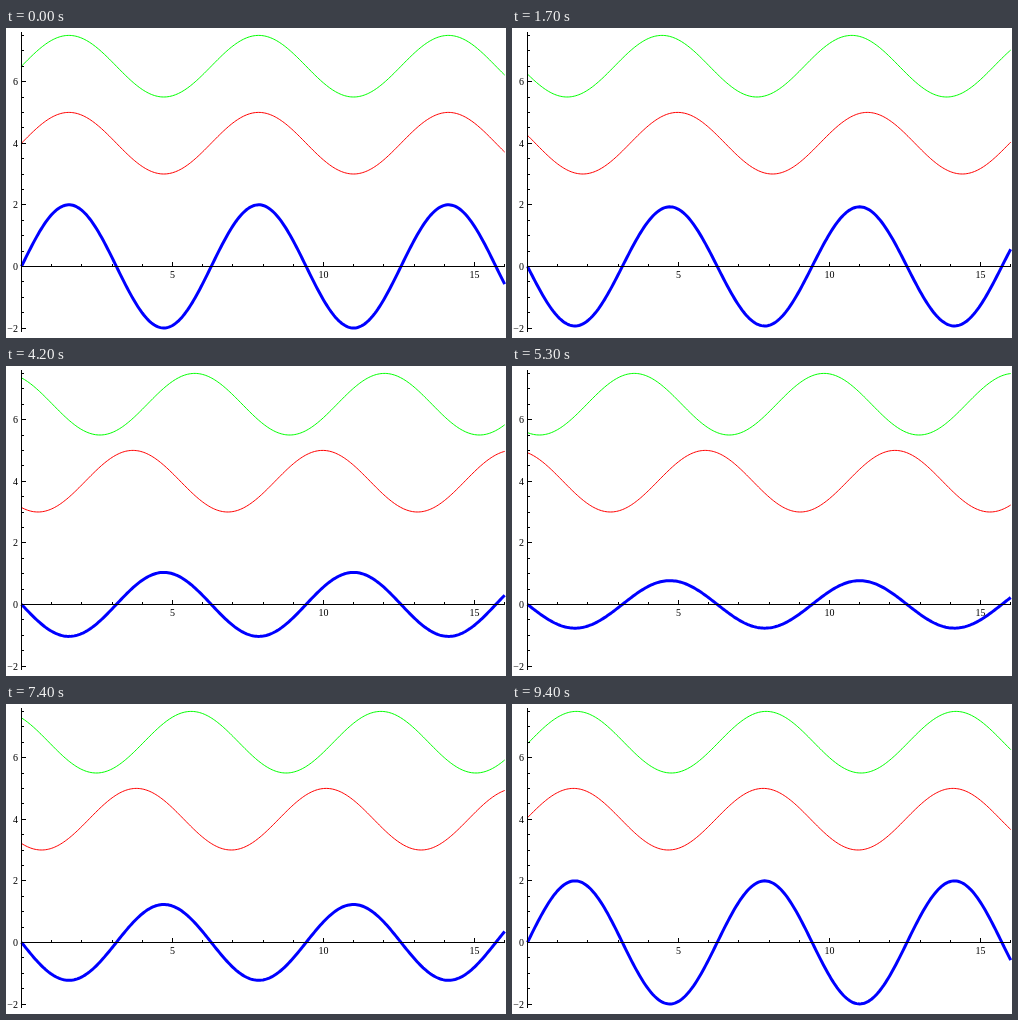
Recreate the animation shown at these times as an HTML page with a canvas. Size 500 by 310 pixels, loop 9500 ms.

```html
<!DOCTYPE html>
<html>
<head>
<meta charset="utf-8">
<style>
html, body { margin: 0; width: 100%; height: 100%; overflow: hidden; background: #fff; }
canvas { display: block; }
</style>
</head>
<body>
<canvas id="plot" width="500" height="310"></canvas>
<script>
const ctx = document.getElementById('plot').getContext('2d');
const STEP = 100, LOOP = 9500, PHASE_STEP = 0.2, X_MAX = 16;
const px = x => 15.5 + 30.2 * x;
const py = y => 238.4 - 30.8 * y;
const crisp = v => Math.floor(v) + 0.5;

function line(x1, y1, x2, y2) {
  ctx.beginPath();
  ctx.moveTo(x1, y1);
  ctx.lineTo(x2, y2);
  ctx.stroke();
}

function curve(f, color, width) {
  ctx.strokeStyle = color;
  ctx.lineWidth = width;
  ctx.beginPath();
  for (let i = 0; i <= 320; i++) {
    const x = i * X_MAX / 320;
    ctx.lineTo(px(x), py(f(x)));
  }
  ctx.stroke();
}

function axes() {
  ctx.strokeStyle = ctx.fillStyle = '#000';
  ctx.lineWidth = 1;
  ctx.font = '10px "Liberation Serif", Times, serif';
  const x0 = 15.5, y0 = 238.5;
  line(x0, 4, x0, 304);
  line(15, y0, 499, y0);

  ctx.textAlign = 'center';
  for (let x = 1; x <= X_MAX; x++) {
    const major = x % 5 === 0, tx = crisp(px(x));
    line(tx, y0, tx, y0 - (major ? 4.5 : 2.5));
    if (major) ctx.fillText(x, tx, 250);
  }

  ctx.textAlign = 'right';
  for (let y = -2; y <= 7.5; y += 0.5) {
    const major = y % 2 === 0, ty = crisp(py(y));
    line(x0, ty, x0 + (major ? 4.5 : 2.5), ty);
    if (major) ctx.fillText(String(y).replace('-', '\u2212'), 12, ty + 3.5);
  }
}

function draw(now) {
  const p = Math.floor(now % LOOP / STEP) * PHASE_STEP;
  ctx.fillStyle = '#fff';
  ctx.fillRect(0, 0, 500, 310);
  curve(x => 2 * Math.cos(p) * Math.sin(x), '#00f', 3);
  curve(x => 4 + Math.sin(x - p), '#f00', 1);
  curve(x => 6.5 + Math.sin(x + p), '#0f0', 1);
  axes();
}

const start = performance.now();
function tick() {
  draw(performance.now() - start);
  requestAnimationFrame(tick);
}
tick();
</script>
</body>
</html>
```
